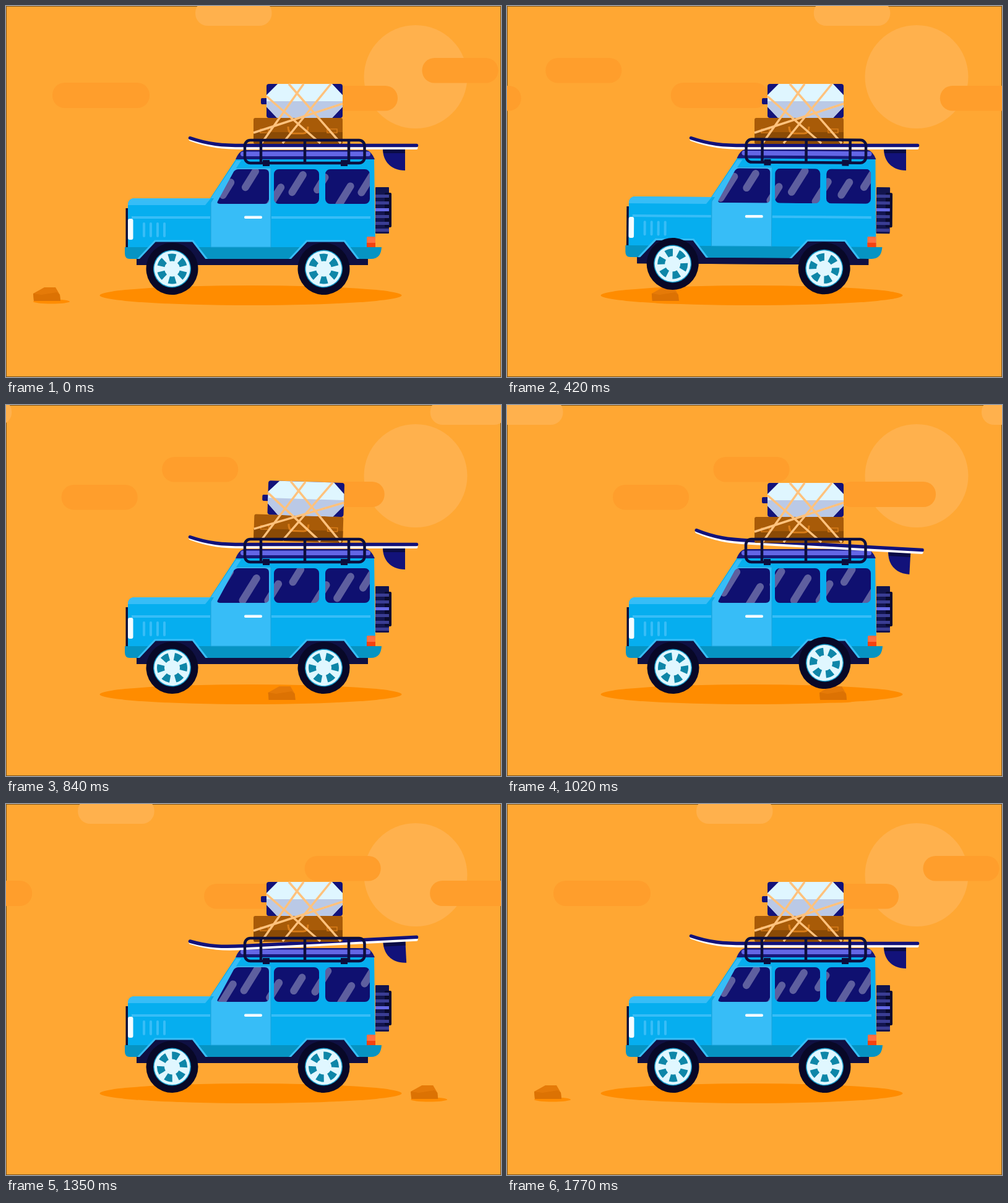
An HTML page that plays this animation: 800 by 600 pixels, repeating every 1800 ms.

```html
<!DOCTYPE html>
<html lang="en">
<head>
<meta charset="utf-8">
<title>Road trip</title>
<style>
  html, body { margin: 0; width: 100%; height: 100%; overflow: hidden; background: #ffa733; }
  svg { display: block; width: 100vw; height: 100vh; }
</style>
</head>
<body>
<svg viewBox="0 0 800 600">
  <defs>
    <clipPath id="glass">
      <path d="M342 316L368 268Q371 264 376 264H418Q425 264 425 271V313Q425 320 418 320H346Q340 320 342 316Z"/>
      <rect x="433" y="264" width="73" height="56" rx="8"/>
      <rect x="516" y="264" width="72" height="56" rx="8"/>
    </clipPath>
    <g id="wheelArt">
      <circle r="42" fill="#080827"/>
      <circle r="30.5" fill="#1599c8"/>
      <circle r="29" fill="#e0f7ff"/>
      <circle r="18.5" fill="none" stroke="#0e86a8" stroke-width="12" pathLength="60" stroke-dasharray="5.6 4.4"/>
    </g>
    <path id="arch" d="M213 410L241 380H302L325 410"/>
  </defs>

  <rect width="800" height="600" fill="#ffa733"/>
  <rect x=".5" y=".5" width="799" height="599" fill="none" stroke="#000" stroke-opacity=".5"/>
  <circle cx="662" cy="114.5" r="83.5" fill="#ffb14d"/>
  <g class="drift">
    <g id="clouds" fill="#ff9e2c">
      <rect x="306" y="-9" width="123.5" height="41" rx="20" fill="#ffb14d"/>
      <rect x="75" y="124" width="157" height="41" rx="20"/>
      <rect x="510" y="129" width="123" height="40.5" rx="20"/>
      <rect x="672.5" y="84" width="123" height="40.5" rx="20"/>
    </g>
    <use href="#clouds" x="-800"/>
  </g>
  <ellipse cx="395.5" cy="468" rx="244" ry="16" fill="#ff8c00"/>
  <g class="drift">
    <g id="rock">
      <ellipse cx="73.5" cy="478" rx="29.5" ry="3.5" fill="#ff8c00"/>
      <path d="M45 477L44 465L62 455H80L87 467L88 477Z" fill="#e57a08"/>
      <path d="M45 477L44 465L57 467L82 463L87 467L88 477Z" fill="#dc7203"/>
    </g>
    <use href="#rock" x="-800"/>
  </g>

  <g class="car">
    <rect x="597" y="293" width="22" height="75" rx="1" fill="#12144e"/>
    <rect x="612" y="302" width="11" height="56" rx="2" fill="#090a2e"/>
    <g id="treads"></g>
    <rect x="211" y="404" width="374" height="15" fill="#0f1042"/>
    <rect x="193.5" y="327" width="6" height="64" fill="#0c0d3a"/>

    <path d="M197 392V321Q198 311 208 311H330L372 247H595L597 392Z" fill="#06aeef"/>
    <path d="M197 322V320Q198 311 208 311H331L322 322Z" fill="#37bdf7"/>
    <path d="M192 390H607Q606 409 590 409H200Q192 409 192 400Z" fill="#0694c3"/>
    <path d="M331 390V318L366 262H428V390Z" fill="#37bdf7" stroke="#1aa2d8"/>
    <path d="M331 311L372 250H380L340 311Z" fill="#37bdf7"/>
    <path d="M203 342H330M429 342H589" stroke="#37bdf7" stroke-width="4"/>
    <path d="M223 352V372M234 352V372M245 352V372M256 352V372" stroke="#37bdf7" stroke-width="4" stroke-linecap="round"/>
    <rect x="197" y="344" width="8.5" height="34" rx="3" fill="#f4fcff"/>
    <rect x="385" y="339.5" width="29" height="4.5" rx="2" fill="#f4fcff"/>
    <rect x="583" y="373" width="14" height="17" rx="1.5" fill="#ff7043"/>
    <rect x="583" y="383" width="14" height="7" fill="#f64210"/>
    <g fill="#0f1042" stroke="#37bdf7" stroke-width="3">
      <use href="#arch"/>
      <use href="#arch" x="245"/>
    </g>
    <rect x="211" y="409" width="374" height="10" fill="#0f1042"/>

    <g clip-path="url(#glass)">
      <rect x="335" y="260" width="260" height="64" fill="#0f1070"/>
      <g class="drift" stroke="#fff" stroke-opacity=".33" stroke-width="12" stroke-linecap="round">
        <g id="glints"></g>
        <use href="#glints" x="-800"/>
      </g>
    </g>

    <path d="M371 248Q377 233 387 233H582Q590 234 596 248Z" fill="#17187a"/>
    <rect x="379" y="235.5" width="210" height="7.5" rx="3.5" fill="#6366e6"/>
    <use id="frontWheel" href="#wheelArt"/>
    <use id="rearWheel" href="#wheelArt"/>
  </g>

  <g id="board" fill="none" stroke-linecap="round">
    <path d="M609 231H645V266C624 266 609 253 609 231Z" fill="#12127a"/>
    <path d="M609 231H645V238H610Z" fill="#0a0b45"/>
    <path d="M298 216C328 227 350 229.5 384 229.5H663" stroke="#fff" stroke-width="5"/>
    <path d="M297.5 213.5C328 224 350 225.5 384 225.5H663.5" stroke="#12127a" stroke-width="5.5"/>
  </g>

  <g id="luggage">
    <rect x="412" y="149" width="12" height="10" rx="2" fill="#12127a"/>
    <rect x="400" y="181" width="144" height="42" rx="3" fill="#a85b08"/>
    <path d="M400 204H544V220Q544 223 541 223H403Q400 223 400 220Z" fill="#8a4a05"/>
    <g fill="none" stroke="#d97c18">
      <path d="M456 195Q456 206 464 206H480Q488 206 488 195" stroke-width="3"/>
      <path d="M411 199H424V205H411ZM519 199H535V205H519Z" stroke-width="1.5"/>
    </g>
    <rect x="421" y="126" width="123" height="55" rx="4" fill="#12127a"/>
    <path d="M439 126H527L544 144V163L527 181H438L421 163V144Z" fill="#dff6ff"/>
    <path d="M421 154H544V163L527 181H438L421 163Z" fill="#bac9e6"/>
    <path d="M481 126L413 222M525 126L447 222M457 126L541 222M421 146L508 222M400 205L544 158" stroke="#ffc27d" stroke-width="3.5"/>
  </g>

  <g class="car">
    <g fill="none" stroke="#0c0e3d" stroke-width="4.5">
      <rect x="386" y="217" width="193.500" height="37" rx="9"/>
      <path d="M412 217V254M483 217V254M554 217V254"/>
    </g>
    <path d="M415 249H426V259H415ZM541 249H552V259H541Z" fill="#0c0e3d"/>
  </g>
</svg>
<script>
const LOOP = 1800, STEP = 30, SPAN = LOOP - STEP, WORLD = 800;
const byId = id => document.getElementById(id);
const setTransform = (el, value) => el.setAttribute('transform', value);
const setAll = (selector, value) =>
  document.querySelectorAll(selector).forEach(el => setTransform(el, value));
const repeat = (count, markup) => Array.from({ length: count }, (_, i) => markup(i)).join('');

// Slanted reflections, evenly spread with alternating heights
const GLINTS = 21;
byId('glints').innerHTML = repeat(GLINTS, i => {
  const x = 14 + i * WORLD / GLINTS;
  const top = 280 + 14 * Math.sin(i * 2.4);
  const bottom = top + 28 + 8 * Math.cos(i * 1.7);
  const lean = (bottom - top) * 0.31;
  return `<path d="M${x + lean} ${top}L${x - lean} ${bottom}"/>`;
});

byId('treads').innerHTML = repeat(6, i =>
  `<rect x="597" y="${305 + i * 11}" width="22" height="5" fill="${i === 2 ? '#6468e4' : '#3a3d94'}"/>`);

// A quick rise and slower fall, from 0 to 1 and back
function hop(t, start, length) {
  const p = Math.min(1, Math.max(0, (t - start) / length));
  return Math.sin(Math.PI * p ** 0.7) ** 2;
}

function setWheel(id, x, lift, t) {
  setTransform(byId(id), `translate(${x} ${425 - lift}) rotate(${13 - 1080 * t / SPAN})`);
}

function draw(t) {
  setAll('.drift', `translate(${WORLD * t / SPAN} 0)`);
  setAll('.car', `rotate(${0.91 * hop(t, 380, 310)} 600 310)`);
  setWheel('frontWheel', 268.5, 8 * hop(t, 360, 310), t);
  setWheel('rearWheel', 513.5, 9.2 * hop(t, 930, 360), t);

  const swing = 4.4 * hop(t, 420, 300) + 10.6 * hop(t, 990, 340) - 3.4 * hop(t, 1300, 200);
  setTransform(byId('board'),
    `translate(${2.6 * Math.max(0, swing)} ${-0.3 * Math.abs(swing)}) rotate(${swing} 481 219.5)`);

  const toss = hop(t, 420, 360);
  setTransform(byId('luggage'),
    `translate(${12.2 * toss} ${-11.2 * toss}) rotate(${8.85 * hop(t, 420, 530)} 544 223)`);
}

let start;
function tick(now) {
  start ??= now;
  draw(Math.floor(((now - start) % LOOP + 0.01) / STEP) * STEP);
  requestAnimationFrame(tick);
}
draw(0);
requestAnimationFrame(tick);
</script>
</body>
</html>
```
